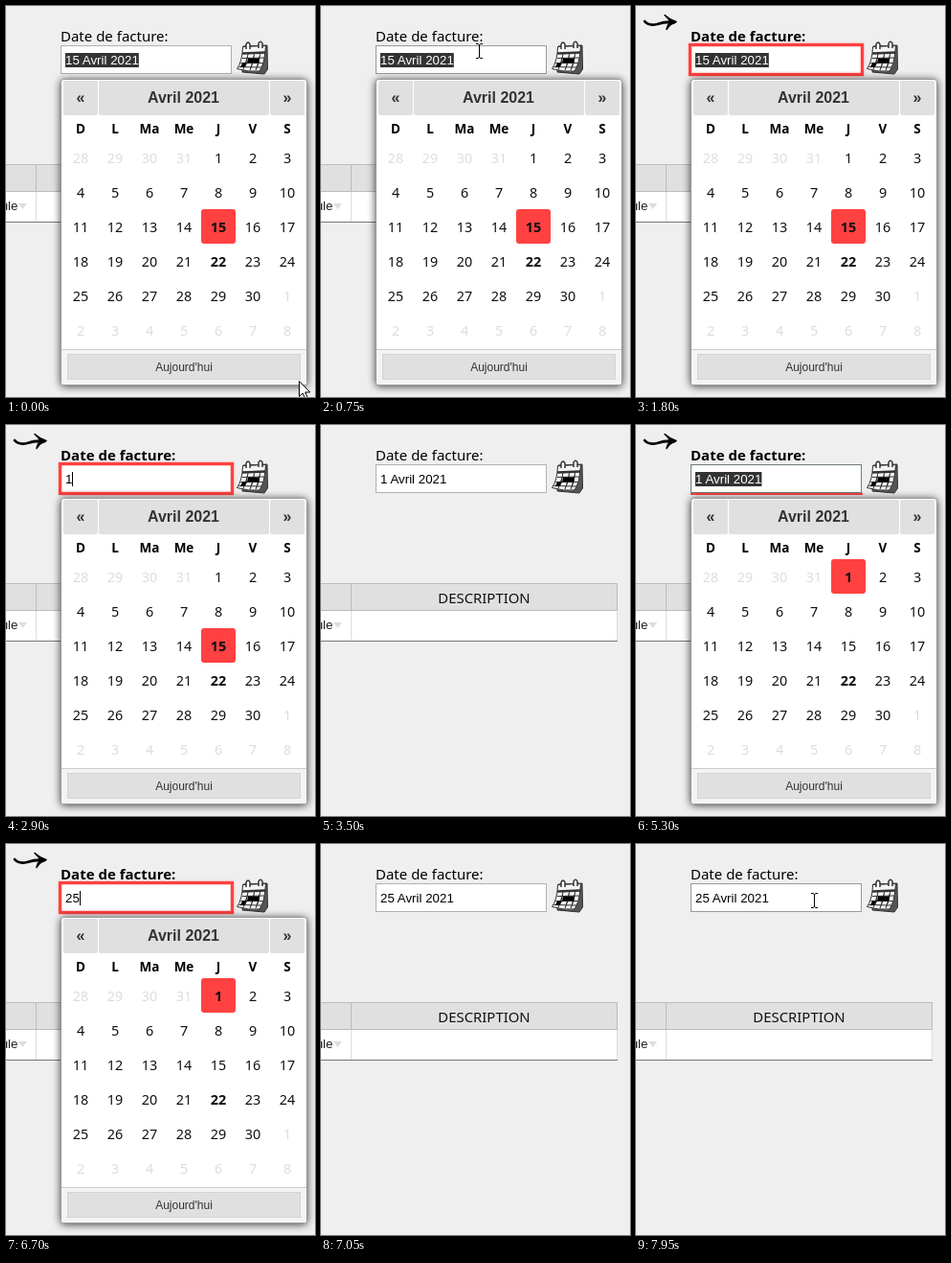
Write an HTML page that moves like this. It is 323 px wide and 408 px high and loops after 8000 ms.

```html
<!DOCTYPE html>
<html lang="fr">
<head>
<meta charset="utf-8">
<title>Date de facture</title>
<style>
html, body { margin: 0; width: 100%; height: 100%; overflow: hidden; background: #efefef; }
svg { display: block; }
text { font-family: "Noto Sans", "Open Sans", sans-serif; font-size: 15px; }
.arial, .arial text { font-family: "Liberation Sans", Arial, sans-serif; }
.mid { text-anchor: middle; }
.bold { font-weight: bold; }
#field text { font-size: 13.333px; white-space: pre; }
#days text { font-size: 14.4px; text-anchor: middle; }
#days .head { font-size: 13.5px; }
#panel { filter: drop-shadow(0 1px 4px rgba(0, 0, 0, .75)); }
#ring { filter: drop-shadow(0 0 1px #ff8080); }
</style>
</head>
<body>
<svg width="323" height="408" viewBox="0 0 323 408">
  <defs><clipPath id="clip"><rect id="clipBox" y="49" height="15"/></clipPath></defs>
  <rect width="323" height="408" fill="#efefef"/>

  <!-- table -->
  <path d="M0 165H310V194H0Z" fill="#e0e0e0"/>
  <path d="M0 194H310V225H0Z" fill="#fff"/>
  <path d="M0 165.5H309.5V193.5H0M31.5 165V193" fill="none" stroke="#bbb"/>
  <path d="M31.5 194V225M309.5 194V225" stroke="#ddd"/>
  <path d="M0 225.5H310" stroke="#777"/>
  <text class="mid" x="170.5" y="186" style="font-size:14.9px" fill="#111">DESCRIPTION</text>
  <text class="arial" x="12.5" y="213" text-anchor="end" style="font-size:13.333px" fill="#222">ule</text>
  <path d="M13 206H22L17.5 212Z" fill="#ddd"/>

  <!-- label and pointer -->
  <text id="label" x="57" y="37">Date de facture:</text>
  <g id="hint" fill="none" stroke="#000" stroke-linecap="round" stroke-linejoin="round">
    <path d="M9 16Q13 21 22 19Q31 16 40 17" stroke-width="2.8"/>
    <path d="M30 9.500Q35 14 42 16.500Q35 19 32 24.500Q33 19 36 17Q34 13 30 9.500Z" fill="#000" stroke-width="1.500"/>
  </g>

  <!-- calendar icon -->
  <g stroke="#333" stroke-linejoin="round">
    <path d="M248 42L273 41L273.500 66L270 71L247 69Z" fill="#555"/>
    <path d="M247.500 42.500L271.500 41.500L271 47Q270 60 265 68Q253 69 241.500 65.500Q247 58 247.500 42.500Z" fill="#f4f4f4"/>
    <path d="M247 49.500L271 48.500" stroke-width="2.500"/>
    <path d="M247 54.500L270 54M245.500 59.500L268.500 59.500M243.500 63.500L267 64M253 50Q252 59 248 66M259.500 50Q259 59 255 67M265.500 50Q265 60 261 67"/>
    <path d="M253 54.500H259L258 59.500H252ZM259 54.500H265L264 59.500H258ZM247 59.500H252L250 63.500H245Z" fill="#000" stroke="none"/>
    <path d="M251 45V40Q253 36 255 40V45M264 44V39Q266 35.500 268 39V44" fill="#fff" stroke-width="1.500"/>
  </g>

  <!-- input -->
  <g id="field" class="arial">
    <rect id="box" x="57.500" y="41.500" width="178" height="29" fill="#fff"/>
    <path id="underline" d="M57 72H237" stroke="#ff4040" stroke-width="2"/>
    <rect id="ring" x="56.500" y="40.500" width="180" height="31" fill="none" stroke="#ff4040" stroke-width="3"/>
    <text id="value" x="62" y="61"></text>
    <g clip-path="url(#clip)">
      <rect x="57" y="49" width="100" height="15" fill="#333"/>
      <text id="picked" x="62" y="61" fill="#fff"></text>
    </g>
    <path id="caret" d="M.5 49V64" stroke="#000"/>
  </g>

  <!-- date picker -->
  <g id="picker">
    <rect id="panel" x="57.500" y="76.500" width="257" height="319" rx="3" fill="#fff" stroke="#999"/>
    <path d="M58 358H314V393Q314 395 312 395H60Q58 395 58 393Z" fill="#f4f4f4"/>
    <path d="M58 358.500H314" stroke="#ccc"/>
    <g fill="#e0e0e0">
      <rect x="60" y="78" width="36" height="36" rx="2"/>
      <rect x="97" y="78" width="178" height="36" rx="2"/>
      <rect x="276" y="78" width="36" height="36" rx="2"/>
      <rect x="64.500" y="363.500" width="243" height="26" stroke="#d4d4d4"/>
    </g>
    <g class="arial mid" fill="#333">
      <text class="bold" x="78" y="101" style="font-size:16px">«</text>
      <text class="bold" x="185.500" y="101" style="font-size:16px">Avril 2021</text>
      <text class="bold" x="294" y="101" style="font-size:16px">»</text>
      <text x="186" y="381" style="font-size:12px">Aujourd'hui</text>
    </g>
    <rect id="mark" x="204" width="36" height="36" rx="3" fill="#ff4141"/>
    <g id="days"></g>
  </g>

  <!-- cursors -->
  <path id="arrow" d="M.5 .5V16.500L4.200 13L6.700 18.500L9.200 17.400L6.800 12H11.800Z" fill="#fff" stroke="#000"/>
  <path id="beam" d="M-3 -7.500H-1L.5 -6.500L2 -7.500H4M.5 -6.500V6.500M-3 7.500H-1L.5 6.500L2 7.500H4" fill="none" stroke="#000"/>
</svg>
<script>
const $ = id => document.getElementById(id);
const show = (id, on) => $(id).style.display = on ? '' : 'none';
const within = (t, a, b) => t >= a && t < b;

function addText(x, y, text, cls, fill) {
  const el = document.createElementNS('http://www.w3.org/2000/svg', 'text');
  el.setAttribute('x', x);
  el.setAttribute('y', y);
  el.setAttribute('class', cls);
  el.setAttribute('fill', fill);
  el.textContent = text;
  $('days').append(el);
  return el;
}

const cells = [];
['D', 'L', 'Ma', 'Me', 'J', 'V', 'S'].forEach((d, i) => addText(78 + 36 * i, 133, d, 'head bold', '#000'));
for (let i = 0; i < 42; i++) {
  const day = i - 3;
  const other = day < 1 || day > 30;
  const n = day < 1 ? day + 31 : day > 30 ? day - 30 : day;
  cells.push(addText(78 + 36 * (i % 7), 164 + 36 * Math.floor(i / 7), n, day === 22 ? 'bold' : '', other ? '#ddd' : '#111'));
}

// Mouse strokes: start, arrival, end, from x, y, to x, y, eased
const strokes = [
  [0, 200, 250, 306, 391, 5, 169, 0],
  [450, 750, 1200, 18, 104, 164.5, 47, 1],
  [1600, 1750, 1800, 235, 56, 9, 42, 0],
  [4350, 4650, 5200, 12, 106, 194, 53, 1],
  [5200, 5250, 5300, 150, 53, 75, 53, 0],
  [7550, 7950, 8000, 10, 105, 185.5, 59, 1]
];

function mouseAt(t) {
  const s = strokes.find(s => within(t, s[0], s[2]));
  if (!s) return null;
  const [a, b, , x0, y0, x1, y1, eased] = s;
  let k = Math.min(1, (t - a) / (b - a));
  if (eased) k = 1 - (1 - k) ** 2;
  return { x: Math.round(x0 + (x1 - x0) * k), y: Math.round(y0 + (y1 - y0) * k) };
}

// Field content: start time, text
const values = [[0, '15 Avril 2021'], [2900, '1'], [3450, '1 Avril 2021'], [6250, '2'], [6700, '25'], [7050, '25 Avril 2021']];

function draw(t) {
  const mouse = mouseAt(t);
  const drag = within(t, 1600, 1800) || within(t, 5200, 5300);
  const inField = mouse && mouse.x > 56 && mouse.x < 237 && mouse.y > 40 && mouse.y < 72;
  const open = t < 3450 || within(t, 4650, 7050);
  const ring = within(t, 950, 3450) || within(t, 6250, 7050);
  const under = within(t, 4650, 6250);

  const text = values.filter(v => v[0] <= t).pop()[1];
  $('value').textContent = $('picked').textContent = text;
  const end = 62 + $('value').getComputedTextLength();

  let from = end;
  if (t < 950 || within(t, 1800, 2900) || within(t, 5300, 6250)) from = 62;
  else if (drag) from = Math.min(end, Math.max(62, mouse.x));
  $('clipBox').setAttribute('x', from);
  $('clipBox').setAttribute('width', end - from);

  show('caret', from === end && (ring || under));
  $('caret').setAttribute('transform', `translate(${Math.round(end)})`);

  $('box').setAttribute('stroke', under ? '#717c7c' : inField ? '#999' : '#b0b0b0');
  show('ring', ring);
  show('underline', under);

  const hint = within(t, 950, 3500) || within(t, 4650, 7050);
  const faint = within(t, 950, 1050) || within(t, 3450, 3500) || within(t, 4650, 4700);
  show('hint', hint);
  $('hint').setAttribute('opacity', faint ? .5 : 1);
  $('label').setAttribute('class', hint && !within(t, 3450, 3500) ? 'bold' : '');

  const first = t >= 3450;
  show('picker', open);
  $('mark').setAttribute('y', first ? 140 : 212);
  cells[4].setAttribute('class', first ? 'bold' : '');
  cells[18].setAttribute('class', first ? '' : 'bold');

  const beam = mouse && (inField || drag);
  show('beam', beam);
  show('arrow', mouse && !beam);
  if (mouse) $(beam ? 'beam' : 'arrow').setAttribute('transform', `translate(${mouse.x} ${mouse.y})`);
}

const begin = performance.now();
function tick() {
  const t = (performance.now() - begin) % 8000;
  draw(Math.floor(t / 50) * 50);
  requestAnimationFrame(tick);
}
tick();
</script>
</body>
</html>
```
